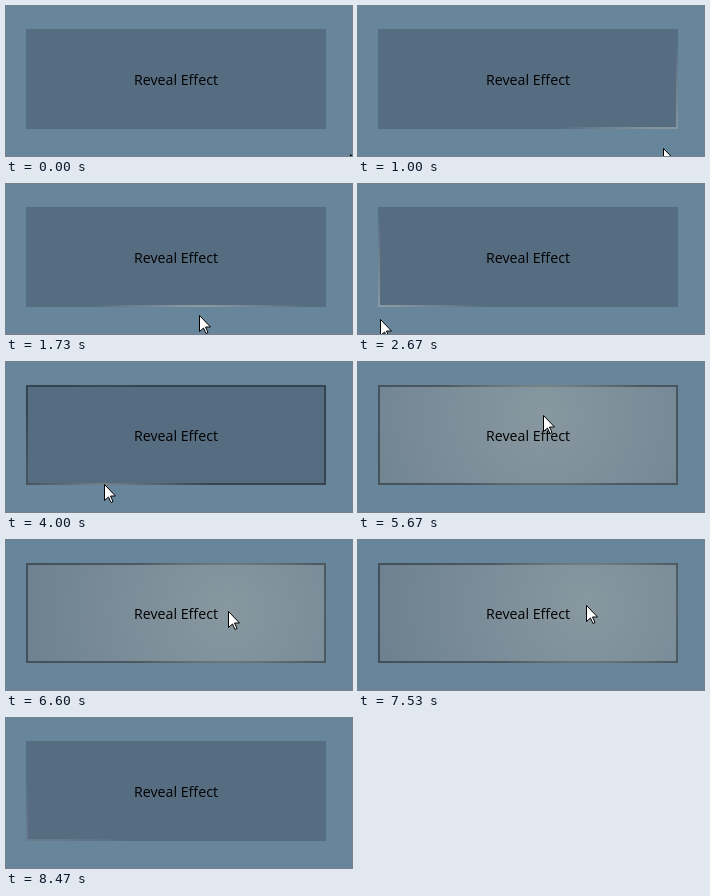
An HTML page with a canvas that plays this animation: 346x150 px, repeating every 8.79 s.

```html
<!DOCTYPE html>
<html lang="en">
<head>
<meta charset="utf-8">
<title>Reveal Effect</title>
<style>
  html, body { margin: 0; width: 100%; height: 100%; overflow: hidden; background: #67869b; }
  canvas { display: block; width: 346px; height: 150px; }
</style>
</head>
<body>
<canvas id="stage" width="346" height="150"></canvas>
<script>
const ctx = document.getElementById('stage').getContext('2d');
const LOOP = 8790, FPS = 15;
const BOX = { x: 20, y: 23, w: 300, h: 100 };
const START = 470, ENTER = 4000, LEAVE = 8110, EXIT = 8333, FADE = 133;

// Key points of the pointer: time in ms, x, y
const PATH = [
  [START, 344, 148], [1733, 193, 131], [2667, 22, 135], [2967, 15, 137],
  [ENTER, 98, 122], [4267, 98, 122], [5233, 75, 70], [5667, 185, 53],
  [6333, 284, 74], [7067, 78, 64], [7533, 228, 65], [7800, 228, 65],
  [EXIT, 26, 166]
];

const clamp = v => Math.max(0, Math.min(1, v));
const ramp = (t, from, length) => clamp((t - from) / length);

// Speed through a key, zero where the direction turns
function slope(i, c) {
  if (i === 0 || i === PATH.length - 1) return 0;
  const [a, b, d] = PATH.slice(i - 1, i + 2);
  const before = (b[c] - a[c]) / (b[0] - a[0]);
  const after = (d[c] - b[c]) / (d[0] - b[0]);
  return before * after <= 0 ? 0 : 2 * before * after / (before + after);
}

function pointer(t) {
  let i = 0;
  while (i < PATH.length - 2 && t >= PATH[i + 1][0]) i++;
  const a = PATH[i], b = PATH[i + 1], span = b[0] - a[0];
  const u = ramp(t, a[0], span), s = u * u * (3 - 2 * u);
  const at = c => Math.round(a[c] + (b[c] - a[c]) * s
    + span * u * (1 - u) * ((1 - u) * slope(i, c) - u * slope(i + 1, c)));
  return { x: at(1), y: at(2) };
}

function glow(p, radius, rgb, alpha) {
  const g = ctx.createRadialGradient(p.x, p.y, 0, p.x, p.y, radius);
  g.addColorStop(0, `rgba(${rgb},${alpha})`);
  g.addColorStop(1, `rgba(${rgb},0)`);
  return g;
}

function fillBox(style) {
  ctx.fillStyle = style;
  ctx.fillRect(BOX.x, BOX.y, BOX.w, BOX.h);
}

function border(style) {
  ctx.strokeStyle = style;
  ctx.lineWidth = 2;
  ctx.strokeRect(BOX.x + 1, BOX.y + 1, BOX.w - 2, BOX.h - 2);
}

const ARROW = new Path2D('M0 0V16L4 12.5L6.5 18L8.5 17L6 11.5H11Z');

function arrow(p) {
  ctx.save();
  ctx.translate(p.x + 0.5, p.y + 0.5);
  ctx.fillStyle = '#fff';
  ctx.fill(ARROW);
  ctx.strokeStyle = '#000';
  ctx.lineWidth = 1;
  ctx.stroke(ARROW);
  ctx.restore();
}

function draw(t) {
  const p = pointer(t);
  const inside = t >= ENTER && t < LEAVE;
  const hover = ramp(t, ENTER, FADE) * (1 - ramp(t, LEAVE, FADE));
  const near = ramp(t, START, 300) * (1 - 0.5 * ramp(t, EXIT, FADE));

  ctx.fillStyle = '#67869b';
  ctx.fillRect(0, 0, 346, 150);
  ctx.fillStyle = '#6d859a';
  ctx.fillRect(0, 149, 346, 1);

  fillBox('#566d81');
  fillBox(`rgba(255,255,240,${0.13 * hover})`);
  fillBox(glow(p, 220, '255,255,235', 0.19 * hover));
  if (inside) border('rgba(0,0,0,0.38)');
  border(glow(p, 105, '185,192,190', (inside ? 0.5 : 0.6) * near));

  ctx.fillStyle = '#000';
  ctx.font = '14.2px "Open Sans", "Noto Sans", sans-serif';
  ctx.textAlign = 'center';
  ctx.fillText('Reveal Effect', 170, 79);

  arrow(p);
}

// The picture advances in steps of 1/15 s
function tick() {
  const t = performance.now() % LOOP;
  draw(Math.floor((t + 5) * FPS / 1000) * 1000 / FPS);
  requestAnimationFrame(tick);
}
tick();
</script>
</body>
</html>
```
